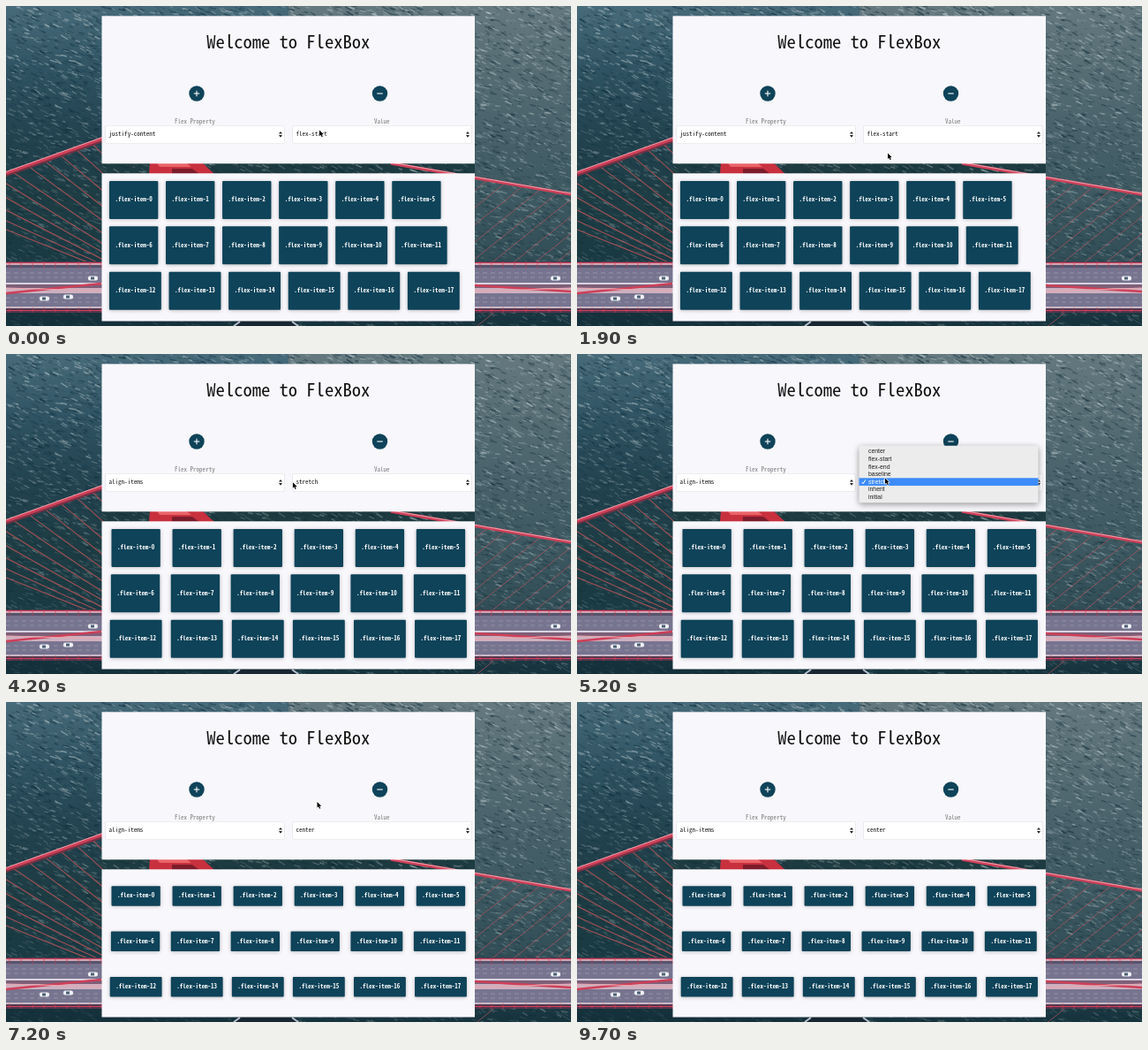
These frames come from a looping animation (640 px wide and 362 px high, 9.8 s). An HTML page with a canvas:

```html
<!DOCTYPE html>
<html lang="en">
<head>
<meta charset="utf-8">
<title>Flexbox playground</title>
<style>
  html, body { margin: 0; width: 100%; height: 100%; overflow: hidden; background: #29474f; }
  canvas { display: block; }
</style>
</head>
<body>
<canvas id="stage" width="640" height="362"></canvas>
<script>
const W = 640, H = 362, LOOP = 9800;
const TEAL = '#0e4359', PANEL = '#f8f7fb';
const MONO = '"Noto Sans Mono CJK JP", "Noto Sans Mono", monospace';
const SANS = '"Liberation Sans", Arial, sans-serif';
const stage = document.getElementById('stage');
let ctx = stage.getContext('2d');

// Font size in proportion to the advance of one monospaced character
ctx.font = `100px ${MONO}`;
const emPerAdvance = 100 / ctx.measureText('0').width;

function mono(text, x, y, advance, color, weight = 400, align = 'left') {
  ctx.font = `${weight} ${advance * emPerAdvance}px ${MONO}`;
  ctx.textAlign = align;
  ctx.fillStyle = color;
  ctx.fillText(text, x, y);
}

function rect(x, y, w, h, color) {
  ctx.fillStyle = color;
  ctx.fillRect(x, y, w, h);
}

function path(points, { fill, stroke, width = 1 }) {
  ctx.beginPath();
  for (let i = 0; i < points.length; i += 2) ctx.lineTo(points[i], points[i + 1]);
  if (fill) { ctx.closePath(); ctx.fillStyle = fill; ctx.fill(); }
  if (stroke) { ctx.strokeStyle = stroke; ctx.lineWidth = width; ctx.stroke(); }
}

const line = (x1, y1, x2, y2, stroke, width) => path([x1, y1, x2, y2], { stroke, width });

function box(x, y, w, h, radius, fill) {
  ctx.beginPath();
  ctx.roundRect(x, y, w, h, radius);
  ctx.fillStyle = fill;
  ctx.fill();
}

function shadow(color, blur, y) {
  ctx.shadowColor = color;
  ctx.shadowBlur = blur;
  ctx.shadowOffsetY = y;
}

// ---- Backdrop ----
function verticalFade(x, w, colors) {
  const fade = ctx.createLinearGradient(0, 0, 0, H);
  colors.forEach((color, i) => fade.addColorStop(i / (colors.length - 1), color));
  rect(x, 0, w, H, fade);
}

function paintSea() {
  verticalFade(0, 320, ['#486b7a', '#2f5362', '#234350', '#1d3c43', '#1a3a43', '#14303a']);
  verticalFade(320, 320, ['#64797f', '#566d74', '#48616a', '#3d5860', '#314d56', '#16333d']);
  rect(108, 176, 423, 14, '#1d3b40');

  let seed = 7;
  const random = () => (seed = seed * 16807 % 2147483647) / 2147483647;
  ctx.lineCap = 'round';
  for (let i = 0; i < 9000; i++) {
    const x = random() * W, y = random() * H;
    const length = 2 + random() * 5, slope = length * (0.1 + random() * 0.6);
    const calm = Math.min(1, y / 330) * (x < 320 ? 1 : 0.65);
    const strength = (0.15 + random() * 0.35) * (1 - 0.75 * calm);
    const tone = random() < 0.46 ? '205,218,220' : '8,38,52';
    line(x, y, x + length, y + slope, `rgba(${tone},${strength})`, 0.7 + random() * 1.1);
  }
  ctx.lineCap = 'butt';
}

function paintBridge() {
  const red = '#cf3f58', pale = '#eda4ae', hanger = 'rgba(178,84,88,.85)';
  // Hangers fan out from the main cables
  for (let i = 0; i < 11; i++) {
    const x = 96 - i * 18, top = 189 - x * 0.36, slope = 0.95 - i * 0.055;
    line(x, top, 112, top + (112 - x) * slope, hanger, 1.2);
  }
  for (let i = 0; i < 9; i++) {
    const x = 545 + i * 20, y = 195 + (x - 531) * 0.172;
    line(x, y, 520, y + (x - 520) * 0.8, 'rgba(178,84,98,.7)', 1);
  }

  // Deck
  rect(0, 289, W, 57, '#77748f');
  rect(0, 289, W, 2, '#47394f');
  rect(0, 291, W, 2, '#d3a3b1');
  rect(0, 293, W, 3, '#57536d');
  rect(0, 313, W, 2, '#d9d2df');
  rect(0, 315, W, 4, '#7e5f78');
  rect(0, 319, W, 6, '#cdb0bf');
  rect(0, 340, W, 2, '#c9b9c8');
  rect(0, 342, W, 5, '#54364d');
  ctx.setLineDash([5, 4]);
  for (const y of [302, 307, 330, 335]) line(0, y, W, y, 'rgba(225,223,238,.45)', 0.6);
  ctx.setLineDash([]);
  for (let x = 4; x < W; x += 13) {
    line(x, 289, x, 297, 'rgba(190,64,88,.7)', 1);
    line(x, 341, x, 347, 'rgba(190,64,88,.7)', 1);
  }
  line(0, 290.5, W, 290.5, red, 1);
  line(0, 344.5, W, 344.5, red, 1.2);
  line(0, 325, 108, 314, red, 2.5);
  line(0, 319, 108, 322, pale, 1.2);
  line(531, 316, W, 323, red, 2.5);
  line(531, 323, W, 319, pale, 1.2);

  // Traffic
  for (const [x, y] of [[98, 308], [70, 329], [43, 331], [622, 308]]) {
    box(x - 5, y - 2.5, 11, 5, 2, '#eef0f5');
    rect(x - 2, y - 1.5, 4, 3, '#4d6077');
  }

  // Main cables and tower
  line(0, 192, 112, 152, '#7b2f42', 2);
  line(0, 189, 112, 149, red, 3.5);
  line(0, 187.5, 112, 147.5, pale, 1);
  line(436, 178, W, 213, red, 3.5);
  line(436, 177, W, 212, pale, 1);
  path([163, 177, 222, 177, 236, 190, 162, 190], { fill: '#c8303e' });
  path([171, 178, 205, 178, 210, 182, 174, 182], { fill: '#ea6468' });
  path([188, 184, 211, 184, 219, 190, 188, 190], { fill: '#7c1c2b' });
  path([258, 362, 264, 356, 325, 356, 331, 362], { fill: '#172630' });
  line(258, 362, 265, 357, '#b8c1d0', 2);
  line(324, 357, 331, 362, '#b8c1d0', 2);
}

function makeBackdrop() {
  const layer = document.createElement('canvas');
  layer.width = W;
  layer.height = H;
  const main = ctx;
  ctx = layer.getContext('2d');
  paintSea();
  paintBridge();
  ctx = main;
  return layer;
}

// ---- Page ----
function roundButton(x, isPlus) {
  ctx.beginPath();
  ctx.arc(x, 99, 8.7, 0, 7);
  ctx.fillStyle = TEAL;
  ctx.fill();
  line(x - 3.2, 99, x + 3.2, 99, '#fff', 1.1);
  if (isPlus) line(x, 95.8, x, 102.2, '#fff', 1.1);
}

function select(x, label, value) {
  mono(label, x + 101.3, 132.9, 3.53, '#777', 400, 'center');
  box(x, 135, 203, 21, 2, '#dcdce1');
  box(x + 0.5, 135.5, 202, 20, 1.5, '#fff');
  mono(value, x + 4, 147.4, 3.53, '#111');
  const a = x + 198.5;
  path([a - 2, 144.6, a, 141.9, a + 2, 144.6], { fill: '#222' });
  path([a - 2, 146, a, 148.7, a + 2, 146], { fill: '#222' });
}

function flexItems(justify, align) {
  const advance = 3.53, gap = 8.7, left = 112.6, room = 414.4;
  const height = align === 'center' ? 22.5 : 43;
  for (let row = 0; row < 3; row++) {
    const names = Array.from({ length: 6 }, (_, i) => `.flex-item-${row * 6 + i}`);
    const widths = names.map(name => name.length * advance + 13);
    const used = widths.reduce((sum, w) => sum + w + gap, 0);
    const side = justify === 'space-around' ? (room - used) / 12 : 0;
    const middle = 219.4 + row * 51.4;
    let x = left;
    names.forEach((name, i) => {
      x += side + gap / 2;
      shadow('rgba(0,0,0,.25)', 4, 0.7);
      box(x, middle - height / 2, widths[i], height, 1, TEAL);
      shadow('transparent', 0, 0);
      mono(name, x + widths[i] / 2, middle + 2, advance, '#fff', 700, 'center');
      x += widths[i] + gap / 2 + side;
    });
  }
}

function popup(x, options, current, pointerY) {
  const pitch = 8.65, first = 140.3 - options.indexOf(current) * pitch;
  shadow('rgba(0,0,0,.4)', 7, 2);
  box(x, first - 2, 203, options.length * pitch + 4, 1.5, '#ececec');
  shadow('transparent', 0, 0);
  const hovered = Math.floor((pointerY - first) / pitch);
  options.forEach((option, i) => {
    const y = first + i * pitch;
    if (i === hovered) rect(x, y, 203, pitch, '#3c8bf8');
    const color = i === hovered ? '#fff' : '#222';
    ctx.font = `6.9px ${SANS}`;
    ctx.textAlign = 'left';
    ctx.fillStyle = color;
    ctx.fillText(option, x + 10.5, y + 6.5);
    if (option === current) {
      path([x + 3.2, y + 4.5, x + 4.7, y + 6.4, x + 7.3, y + 2], { stroke: color, width: 1 });
    }
  });
}

function pointer(x, y) {
  ctx.save();
  ctx.translate(x, y);
  ctx.scale(0.9, 0.9);
  ctx.lineJoin = 'round';
  const arrow = [0, 0, 0, 7.3, 1.7, 5.8, 2.9, 8.6, 4.2, 8, 3, 5.3, 5.3, 5.3];
  path([...arrow, 0, 0], { stroke: '#fff', width: 1.3 });
  path(arrow, { fill: '#000' });
  ctx.restore();
}

// ---- Timeline ----
const properties = ['display', 'flex-direction', 'flex-wrap', 'justify-content', 'align-items', 'align-content'];
const justifyValues = ['center', 'flex-start', 'flex-end', 'space-around', 'space-between', 'inherit', 'initial'];
const alignValues = ['center', 'flex-start', 'flex-end', 'baseline', 'stretch', 'inherit', 'initial'];
const menus = [
  { from: 200, to: 1800, x: 319.5, options: justifyValues, current: 'flex-start' },
  { from: 2900, to: 3600, x: 107.5, options: properties, current: 'justify-content' },
  { from: 4700, to: 7000, x: 319.5, options: alignValues, current: 'stretch' },
];
const route = [
  [0, 355, 140.5], [500, 355, 141], [1500, 352, 166], [2000, 352, 166.5], [2800, 292, 145],
  [3200, 291.5, 150.3], [3700, 291, 151], [4600, 349, 141], [5200, 349, 140.5],
  [6400, 352, 112.5], [7200, 352.5, 113], [8000, 352.5, 113],
];

function pointerAt(t) {
  const next = route.findIndex(stop => stop[0] > t);
  if (next < 0) return null;
  const [t0, x0, y0] = route[next - 1], [t1, x1, y1] = route[next];
  const u = (t - t0) / (t1 - t0), ease = u * u * (3 - 2 * u);
  return [x0 + (x1 - x0) * ease, y0 + (y1 - y0) * ease];
}

const backdrop = makeBackdrop();

function draw(t) {
  const justify = t < 2000 ? 'flex-start' : 'space-around';
  const align = t < 7100 ? 'stretch' : 'center';
  const aligning = t >= 3700;
  const mouse = pointerAt(t);

  ctx.drawImage(backdrop, 0, 0);
  rect(108.5, 11.3, 422.5, 167, PANEL);
  rect(108.5, 189.3, 422.5, 167.2, PANEL);
  mono('Welcome to FlexBox', 319.8, 47.6, 10.28, '#111', 400, 'center');
  roundButton(216, true);
  roundButton(423.5, false);
  select(112.5, 'Flex Property', aligning ? 'align-items' : 'justify-content');
  select(324.5, 'Value', aligning ? align : justify);
  flexItems(justify, align);

  const menu = menus.find(m => t >= m.from && t < m.to);
  if (menu) popup(menu.x, menu.options, menu.current, mouse[1]);
  if (mouse) pointer(...mouse);
}

function frame() {
  draw(performance.now() % LOOP);
  requestAnimationFrame(frame);
}
frame();
</script>
</body>
</html>
```
